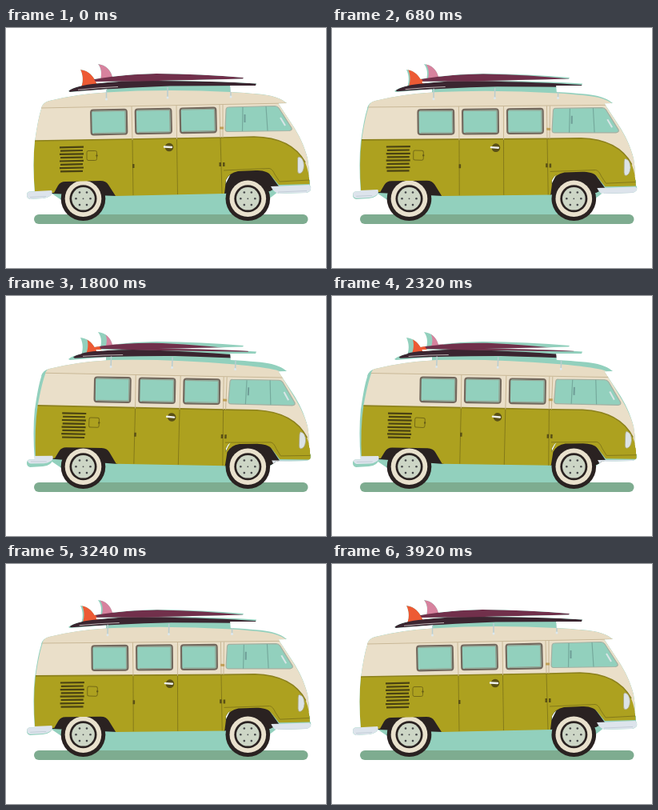
An HTML page that plays this animation: 400x300 px, repeating every 4000 ms.

```html
<!DOCTYPE html>
<html lang="en">
<head>
<meta charset="utf-8">
<title>Camper van</title>
<style>
  html, body { margin: 0; width: 100%; height: 100%; overflow: hidden; background: #fff; }
  svg { display: block; width: 100vw; height: 100vh; }
</style>
</head>
<body>
<svg viewBox="0 0 400 300">
  <defs>
    <path id="upper" d="M45 98 Q40 112 36 142 L36 150 L270 160 L379 185 Q379 174 377 163 C373 147 366 133 358 121 L339 92Z"/>
    <path id="lower" d="M36 141 L270 137 L310 136 C340 136.500 362 146 374 168 Q379 180 379.500 195 L341 196 L331 184 C327 179 320 178 312 178 L290 179 Q279 181 275 190 L273 207 L137 210 L128 196 Q125 191 118 191 L74 192 Q68 192 65 197 L60 206 L36 206 Q33 170 36 141Z"/>
    <path id="roof" d="M44 100 Q46 93 54 91 Q85 83 125 80.500 Q200 76 280 80 Q318 82 332 85 Q344 88 351 94Z"/>
    <path id="rear" d="M29 204.500 L57 203 Q59 207 55 210 Q51 213 46 213 L30 214 Q26 213 26 209 Q26 205 29 204.500Z"/>
    <path id="front" d="M331 198 L379 196 Q382 198 381 202 Q380 205 375 206 L341 207 Q334 205 331 198Z"/>
    <path id="red" d="M93 52 C103 53 110 60 114 71 L94 74 C97 66 96 58 93 52Z"/>
    <path id="pink" d="M115 45 C125 46 131 53 133 61 L118 64 C120 57 119 50 115 45Z"/>
    <path id="plum" d="M110 64 Q150 57.500 188 57 Q245 57.500 297 62 L296 63.500 Q230 65 170 66.500 L112 67Z"/>
    <path id="dark" d="M78 79 Q84 73 108 70 Q145 65.500 180 66 Q260 66 313 69.500 L312 72 Q255 72 205 72.500 Q135 75 80 80Z"/>
    <path id="gap" d="M125 72 L280 71 L281 82 H125Z"/>
    <clipPath id="outline">
      <use href="#upper"/><use href="#lower"/><use href="#roof"/><use href="#rear"/><use href="#front"/>
      <use href="#red"/><use href="#pink"/><use href="#plum"/><use href="#dark"/><use href="#gap"/>
      <path d="M56 206 L66 186 H130 L139 200 H272 L285 174 H330 L380 190 V197 L340 205 L302 234 H97Z"/>
    </clipPath>
    <g id="window">
      <rect x="-22.300" y="-15.300" width="44.600" height="30.600" rx="3" fill="#92d0bd" stroke="#73685d" stroke-width="2.200"/>
      <path d="M-20 -13.700 H20.500 V13.500 H-19" fill="none" stroke="#94a494" stroke-width="1.200"/>
    </g>
    <g id="wheel">
      <circle r="27.800" fill="#2a2221"/>
      <circle r="22.800" fill="#e9e1cd"/>
      <circle r="17" fill="#2a2221"/>
      <circle r="14.300" fill="#cdd6c6"/>
      <g class="bolts" fill="#45474a"></g>
    </g>
    <g id="rack">
      <path d="M0 -12 V1" stroke="#b9cdd0" stroke-width="1.500"/>
      <circle cy="1" r="1.500" fill="#dce8ee"/>
    </g>
  </defs>

  <rect x="35" y="233" width="342.500" height="12" rx="6" fill="#7eac90"/>

  <g clip-path="url(#outline)">
    <rect width="400" height="233" fill="#92d0bd"/>
    <g class="tilt" fill="#2a2221">
      <path d="M57 207 L66 188 H128 L139 210Z"/>
      <path d="M272 207 V184 L285 176 H325 L341 198 L330 204Z"/>
    </g>
  </g>

  <use href="#wheel" x="96.500" y="213.300"/>
  <use href="#wheel" x="302.300" y="213.300"/>

  <g clip-path="url(#outline)">
    <g class="tilt">
      <use href="#pink" fill="#d7829e"/>
      <use href="#red" fill="#ed5a34"/>
      <use href="#dark" fill="#3b2530"/>
      <use href="#plum" fill="#71304b"/>
      <path d="M90 77.300 Q115 74.500 140 73.500" fill="none" stroke="#ddd5d4" stroke-width=".8"/>

      <use href="#upper" fill="#eadfc9"/>
      <use href="#roof" fill="#e8dcc4"/>
      <path d="M44 100 L270 95.500 L351 94" fill="none" stroke="#c9b897" stroke-width="1"/>
      <use href="#lower" fill="#ada11f"/>
      <path d="M36 141 L270 137 L310 136 C340 136.500 362 146 374 168" fill="none" stroke="#8c811d" stroke-width="1.600"/>

      <g fill="none" stroke-width=".9">
        <path d="M157 98 L158 140 M213 97 L213.500 139 M267 96 L268 137 M271 96 V137" stroke="#c5b38f"/>
        <path d="M158 140 L159 209 M213.500 139 L214.500 208 M268 137 L270 207" stroke="#817619"/>
        <path d="M272 178 L329 175.500 Q333 176 336 183 L342 192 L379 190" stroke="#817619"/>
      </g>
      <g fill="#5a5016">
        <rect x="158" y="170" width="2.500" height="5"/>
        <rect x="266.500" y="168" width="2.500" height="5"/>
        <rect x="271" y="168" width="2.500" height="5"/>
      </g>
      <path d="M267 125 h5" stroke="#c09f58" stroke-width="3"/>

      <use href="#window" transform="translate(128.700 117.600) rotate(-1.200)"/>
      <use href="#window" transform="translate(184.300 116.500) rotate(-1.200)"/>
      <use href="#window" transform="translate(240.200 115.400) rotate(-1.200)"/>

      <path d="M278 99 L336 97.500 Q339 97.500 341 100 L357 125 Q358 128 354 128.500 L277 129.500 Q274 129.500 274 126 L275 103 Q275 99 278 99Z" fill="#92d0bd" stroke="#a3b0a2" stroke-width="1.200"/>
      <path d="M296 99 L295.500 129 M325 98 L327 128.500" stroke="#75a99c" stroke-width="1.200"/>
      <path d="M298.500 108 V118" stroke="#6f9d97" stroke-width="2"/>
      <path d="M343 112 L349 122" stroke="#d9e5e6" stroke-width="2"/>

      <g id="vents" stroke="#4a4212" stroke-width="2.200"></g>
      <rect x="101" y="153.500" width="12.500" height="12" rx="2" fill="none" stroke="#756a16"/>
      <circle cx="113.500" cy="159.500" r="1.200" fill="#655b16"/>
      <circle cx="204" cy="149" r="5.300" fill="#5a5016"/>
      <path d="M198 148.500 L207 149" stroke="#eef0ee" stroke-width="2.400" stroke-linecap="round"/>

      <path d="M366 161 Q372 162 372.500 172 Q372 181 367 182 Q364.500 182 364.500 178 V165 Q364.500 161 366 161Z" fill="#dce3e6" stroke="#a9a57e" stroke-width=".8"/>
      <use href="#rear" fill="#dde4ec"/>
      <use href="#front" fill="#dde4ec"/>
      <path d="M30 211.500 L50 210.500 M340 205 L376 203.500" stroke="#c3ced8"/>
      <use href="#rack" x="125.500" y="88"/>
      <use href="#rack" x="202" y="86"/>
      <use href="#rack" x="281" y="85"/>
    </g>
  </g>
</svg>
<script>
  const LOOP = 4000, STEP = 40, SWING = 3920, MAX_TILT = 2.3;
  const NS = 'http://www.w3.org/2000/svg';

  function add(parent, tag, attrs) {
    const el = document.createElementNS(NS, tag);
    for (const key in attrs) el.setAttribute(key, attrs[key]);
    parent.append(el);
  }

  const bolts = document.querySelector('.bolts');
  for (let i = 0; i < 6; i++) {
    const a = i * Math.PI / 3;
    add(bolts, 'circle', { cx: 9 * Math.cos(a), cy: 9 * Math.sin(a), r: 1.3 });
  }
  add(bolts, 'circle', { r: 0.9 });

  const vents = document.getElementById('vents');
  for (let i = 0; i < 8; i++) {
    const y = 149 + i * 4.3;
    add(vents, 'path', { d: `M${67 + i % 2} ${y + 0.3} L${97 - i % 2} ${y - 0.3}` });
  }

  // The body rocks about a point near the road; the wheels stay put.
  const parts = document.querySelectorAll('.tilt');
  function draw(now) {
    const t = Math.min(Math.floor(now % LOOP / STEP) * STEP, SWING);
    const angle = MAX_TILT * (1 - Math.cos(2 * Math.PI * t / SWING)) / 2;
    for (const part of parts) part.setAttribute('transform', `rotate(${angle} 142 230)`);
  }

  let start;
  function tick(now) {
    start ??= now;
    draw(now - start);
    requestAnimationFrame(tick);
  }
  draw(0);
  requestAnimationFrame(tick);
</script>
</body>
</html>
```
